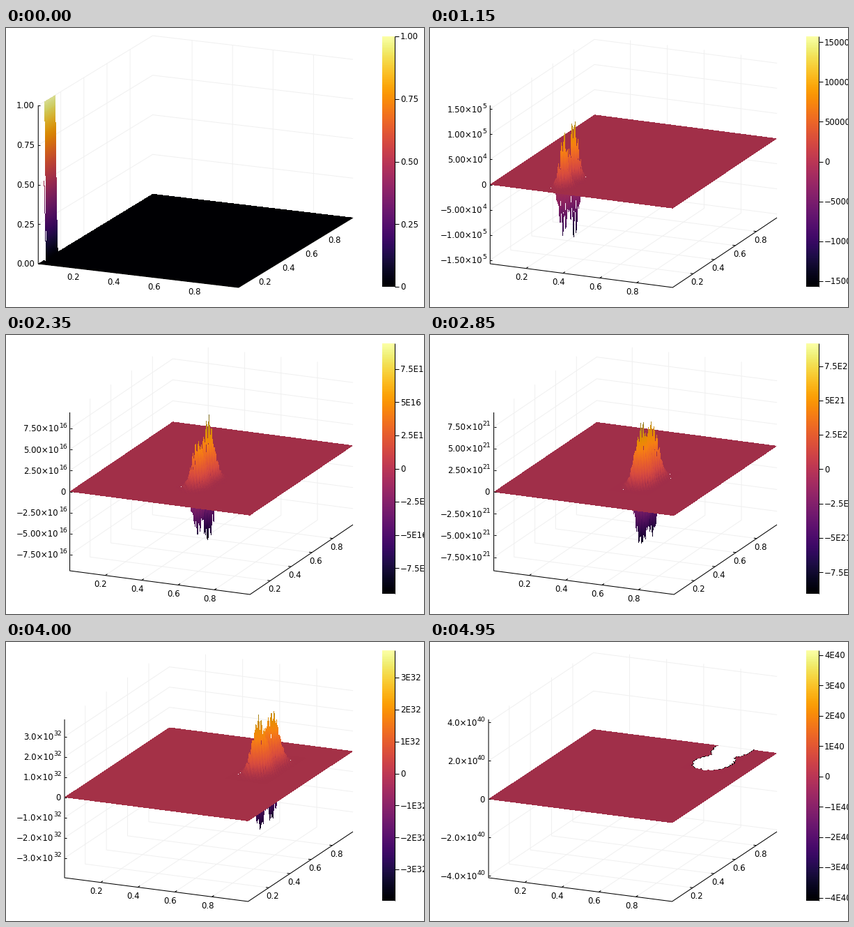
Recreate the animation shown at these times as a matplotlib script. Size 600 by 400 pixels, loop 5 s.

```python
import math

import matplotlib.pyplot as plt
import numpy as np
from matplotlib.animation import FuncAnimation

FRAMES, INTERVAL = 100, 50
STAGE_W, STAGE_H = 600, 400
TOP, BOTTOM, RIGHT = 12, 371, 498      # plot area, pixels
AXIS_TOP, AXIS_BASE = 111, 338         # vertical axis, pixels
DROP, RISE, SPLIT = 34, 100, 0.6364    # floor projection
INSET = .0025                          # surface margin inside the axes
FONT = 11.8
FLOAT_MAX = 3.4e38                     # larger values leave a hole
CELLS = 99
DENSE_V, DENSE_U = 2, 240              # surface samples per cell
U, V = np.meshgrid(np.arange(CELLS + 1) / CELLS, np.arange(CELLS + 1) / CELLS)
I, J = np.meshgrid(np.arange(CELLS + 1), np.arange(CELLS + 1))
CHECKER = 1.0 - 2 * ((I + J) % 2)
CMAP = plt.get_cmap("inferno")

# time, skew, centre x, centre y, lobe gap, lobe width, near and far height
KEYS = np.array([
    [0, 0, 0, .095, .07, .015, .70, .70],
    [23, 0, .350, .140, .10, .020, .68, .80],
    [47, 0, .562, .311, .10, .028, .62, .82],
    [57, .0055, .640, .367, .10, .031, .80, .73],
    [72, -.018, .687, .584, .12, .033, .82, .76],
    [89, -.014, .762, .739, .12, .033, .63, .66],
    [99, .007, .780, .880, .18, .032, .70, .70],
])
GROWTH_T = [0, 6, 12, 23, 47, 57, 72, 89, 99]
GROWTH = [0, .15, 1, 5.197, 16.974, 21.959, 29.0856, 36.538, 40.616]

plt.rcParams["font.family"] = "DejaVu Sans"
fig = plt.figure(figsize=(6, 4), dpi=100, facecolor="white")
ax = fig.add_axes([0, 0, 1, 1])


def split_power(x):
    power = 10.0 ** math.floor(math.log10(x) + 1e-12)
    return x / power, power


def axis_step(span):
    m, power = split_power(span / 2)
    return power * (.5 if m < 2 else 1 if m < 4 else 2 if m < 5 else 2.5)


def bar_step(span):
    m, power = split_power(span)
    return power * (1 if m > 5 else .5 if m > 2.5 else .25)


def ticks(lo, hi, step):
    first, last = math.ceil(lo / step - 1e-9), math.floor(hi / step + 1e-9)
    return [k * step for k in range(first, last + 1)]


def decimals(x):
    d = 0
    while d < 4 and abs(x * 10**d - round(x * 10**d)) > 1e-6:
        d += 1
    return d


def scientific(v):
    e = math.floor(math.log10(abs(v)) + 1e-9)
    return v / 10.0**e, e


def axis_labels(values, step, sci):
    """Pairs of base text and exponent text."""
    if not sci:
        d = decimals(step)
        return [(f"{v:.{d}f}".replace("-", "−"), "") for v in values]
    parts = [scientific(v) if v else None for v in values]
    d = 1 + max(decimals(abs(p[0])) for p in parts if p)
    return [(f"{p[0]:.{d}f}×10".replace("-", "−"), str(p[1])) if p else ("0", "")
            for p in parts]


def bar_label(v, step, big):
    if v == 0:
        return "0"
    if big:
        m, e = scientific(v)
        text = f"{m:.3g}E{e}"
    else:
        text = f"{v:.{decimals(step)}f}"
    return text.replace("-", "−")


def width(text, size=FONT):
    wide = {".": .318, "−": .838, "×": .838}
    return size * sum(wide.get(c, .636) for c in text)


def write(x, y, text, ha="center", size=FONT):
    ax.text(x, y + .365 * size, text, ha=ha, va="baseline",
            fontsize=size * .72, color="black", zorder=5)


def line(points, color="black", zorder=4, lw=.75):
    ax.plot(*zip(*points), color=color, lw=lw, zorder=zorder,
            solid_capstyle="butt")


def refine(a):
    """Bilinear upsampling of a patch."""
    for k in (DENSE_V, DENSE_U):
        p = np.arange((len(a) - 1) * k + 1) / k
        i = np.minimum(p.astype(int), len(a) - 2)
        f = (p - i)[:, None]
        a = ((1 - f) * a[i] + f * a[i + 1]).T
    return a


def field(n):
    """Surface heights with their limits and oscillation share."""
    skew, cx, cy, gap, sigma, near, far = (
        np.interp(n, KEYS[:, 0], col) for col in KEYS[:, 1:].T)
    size = 10 ** np.interp(n, GROWTH_T, GROWTH)
    share = min(1, n / 10)

    def lobe(y, height):
        return height * np.exp(-((U - cx)**2 + ((V - y) / 1.1)**2) / (2 * sigma**2))

    envelope = lobe(cy - gap / 2, near) + lobe(cy + gap / 2, far)
    rough = .96 + .05 * np.sin(1.7 * I + 2.9 * J + n)
    z = share * size * envelope * CHECKER * rough
    if size < 100:
        arc = 1 - np.sqrt(np.maximum(.905**2 - U**2, 0))
        z = z + ((U <= cx + 1e-9) & (np.abs(V - arc) < .047))
    lo, hi = -size * share * (1 - skew), size * (1 + skew)
    z[np.abs(z) < .002 * hi] = 0
    return z, lo, hi, share


class View:
    """Maps unit floor coordinates and heights to pixels."""

    def __init__(self, left, lo, hi):
        self.left, self.lo, self.hi = left, lo, hi
        self.wx = SPLIT * (RIGHT - left)
        self.wy = (1 - SPLIT) * (RIGHT - left)

    def height(self, z):
        return (AXIS_BASE - AXIS_TOP) * (z - self.lo) / (self.hi - self.lo)

    def __call__(self, u, v, z):
        return (self.left + self.wx * u + self.wy * v,
                AXIS_BASE + DROP * u - RISE * v - self.height(z))

    def surface(self, u, v, z):
        scale = 1 - 2 * INSET
        return self(INSET + scale * u, INSET + scale * v, z)


def draw_frame(view, z_ticks, labels):
    lo, hi = view.lo, view.hi
    grid = dict(color="#f0f0f0", zorder=0, lw=.72)
    for value in (.2, .4, .6, .8):
        t = (value - .005) / .99
        line([view(t, 0, lo), view(t, 1, lo), view(t, 1, hi)], **grid)
        line([view(1, t, lo), view(0, t, lo), view(0, t, hi)], **grid)
        x, y = view(t, 0, lo)
        line([(x, y), (x + 3, y - 2)])
        write(x - 6.5, y + 12.3, f"{value}")
        x, y = view(1, t, lo)
        line([(x, y), (x - 4, y - .5)])
        write(x + 5.8, y + 11.8, f"{value}")
    for z, (base, power) in zip(z_ticks, labels):
        line([view(0, 0, z), view(0, 1, z), view(1, 1, z)], **grid)
        x, y = view(0, 0, z)
        line([(x, y), (x + 3, y)])
        end = view.left - 5.5 - width(power, .7 * FONT)
        write(end, y, base, "right")
        if power:
            write(end, y - 5, power, "left", .8 * FONT)
    line([view(0, 0, hi), view(0, 0, lo), view(1, 0, lo), view(1, 1, lo)])


def draw_surface(view, z, share):
    lo, hi = view.lo, view.hi

    def shade(values):
        """Colour map lit strongest on the lower slopes."""
        rgba = CMAP((values - lo) / (hi - lo))
        s = np.minimum(np.abs(values) / hi, 1)
        lit = 1.2 * s - 2 * s**2 - .4 * s * (values < 0)
        rgba[..., :3] *= np.clip(.86 + share * lit, .3, 1)[..., None]
        return rgba

    flat = shade(np.zeros(1))[0]

    def plate(u0, u1, v0, v1):
        if u1 > u0 and v1 > v0:
            corners = [(u0, v0), (u1, v0), (u1, v1), (u0, v1)]
            ax.fill(*zip(*(view.surface(u, v, 0) for u, v in corners)),
                    facecolor=flat, edgecolor="none", antialiased=False, zorder=2)

    rows, cols = np.nonzero(z)
    j0, j1 = max(rows.min() - 1, 0), min(rows.max() + 1, CELLS)
    i0, i1 = max(cols.min() - 1, 0), min(cols.max() + 1, CELLS)
    u0, u1, v0, v1 = (k / CELLS for k in (i0, i1, j0, j1))

    # Far plates, then the rough patch, then the near plates.
    plate(0, 1, v1, 1)
    plate(0, u0, v0, v1)

    patch = z[j0:j1 + 1, i0:i1 + 1]
    lost = np.abs(patch) > FLOAT_MAX
    dense = refine(np.where(lost, 0, patch))
    u = np.linspace(u0, u1, dense.shape[1])[None, :]
    v = np.linspace(v0, v1, dense.shape[0])[:, None]
    x, y = view.surface(u, v, dense)
    colors = shade(dense)
    if lost.any():
        missing = refine(lost.astype(float))
        colors[missing > 0, :3] = 0
        colors[missing > .4] = 0
    # Far to near, so that later samples cover earlier ones.
    px = np.clip(x[::-1].astype(int), 0, STAGE_W - 1)
    py = np.clip(y[::-1].astype(int), 0, STAGE_H - 1)
    image = np.zeros((STAGE_H, STAGE_W, 4))
    image[py, px] = colors[::-1]
    ax.imshow(image, extent=(0, STAGE_W, STAGE_H, 0), aspect="auto",
              interpolation="nearest", zorder=2)

    plate(u1, 1, v0, v1)
    plate(0, 1, 0, v0)


def draw_bar(lo, hi):
    ax.imshow(np.linspace(1, 0, 256)[:, None], cmap=CMAP, aspect="auto",
              extent=(540, 558, BOTTOM, TOP), zorder=1)
    line([(558, TOP), (558, BOTTOM)])
    step = bar_step(hi - lo)
    for v in ticks(lo, hi, step):
        y = BOTTOM - (BOTTOM - TOP) * (v - lo) / (hi - lo)
        line([(558, y), (564, y)])
        write(566, y, bar_label(v, step, hi >= 1e6), "left")


def draw(n):
    ax.clear()
    ax.axis("off")
    z, lo, hi, share = field(n)
    step = axis_step(hi - lo)
    z_ticks = ticks(lo, hi, step)
    labels = axis_labels(z_ticks, step, hi - lo > 1e5)
    left = 20 + max(width(b) + width(p, .7 * FONT) for b, p in labels)
    view = View(left, lo, hi)
    draw_frame(view, z_ticks, labels)
    draw_surface(view, z, share)
    draw_bar(lo, hi)
    ax.set_xlim(0, STAGE_W)
    ax.set_ylim(STAGE_H, 0)
    return []


anim = FuncAnimation(fig, draw, frames=FRAMES, init_func=lambda: [],
                     interval=INTERVAL, repeat=True, repeat_delay=0)
plt.show()
```
